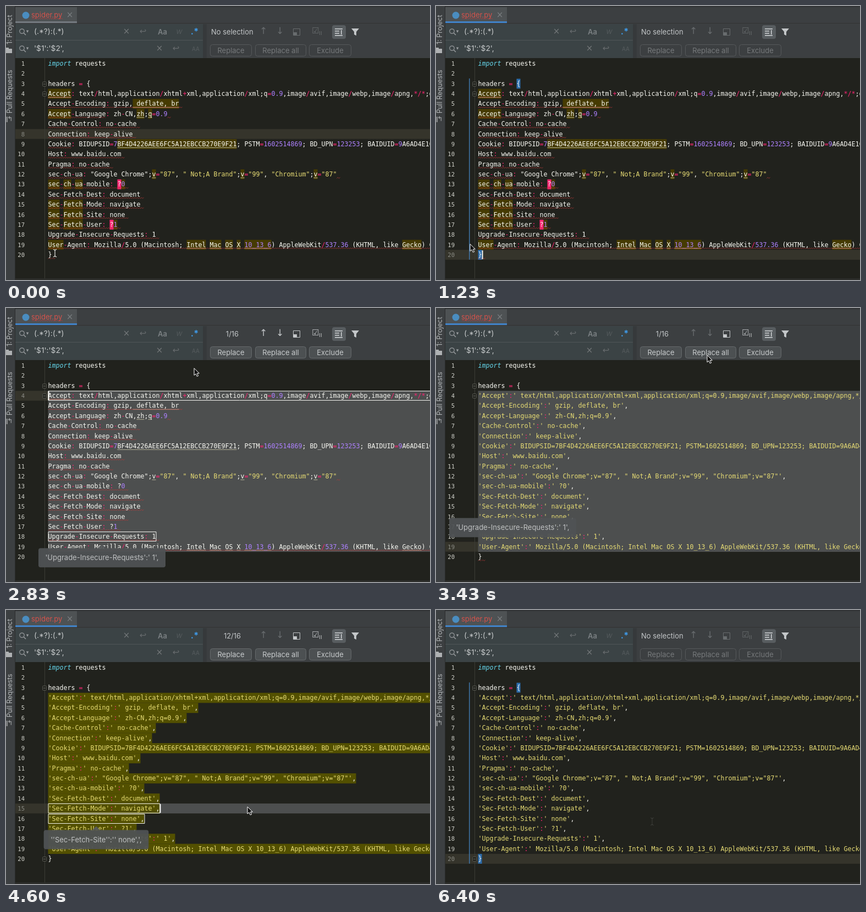
Recreate the animation shown at these times as an HTML page with a canvas. Size 771 by 500 pixels, loop 6.43 s.

```html
<!DOCTYPE html>
<html lang="en">
<head>
<meta charset="utf-8">
<title>Regex replace in an editor</title>
<style>
html, body { margin: 0; width: 100%; height: 100%; overflow: hidden; background: #21221d; }
canvas { display: block; }
</style>
</head>
<body>
<canvas id="stage" width="771" height="500"></canvas>
<script>
const c = document.getElementById('stage').getContext('2d');
const LOOP = 6430, LEFT = 76.5, CW = 7, ROW = 18.37;
const MONO = '11.65px "DejaVu Sans Mono", monospace';
const SANS = '13px Inter, sans-serif';
const RED = '#f92672', WHITE = '#f8f8f2', YELLOW = '#e6db74', PURPLE = '#ae81ff';
const ON = '#c3c6c8', OFF = '#686c6e', SELECTED = '#4d4f4f';

// Moments when the editor state changes
const T = { click: 450, press: 1330, drag: 1370, selected: 2000, hint: 2030,
            replace: 3370, settle: 3600, deselect: 4560, clear: 4900, brace: 6050 };

const raw = `import requests

headers = {
Accept: text/html,application/xhtml+xml,application/xml;q=0.9,image/avif,image/webp,image/apng,*/*;q=0.8
Accept-Encoding: gzip, deflate, br
Accept-Language: zh-CN,zh;q=0.9
Cache-Control: no-cache
Connection: keep-alive
Cookie: BIDUPSID=7BF4D4226AEE6FC5A12EBCCB270E9F21; PSTM=1602514869; BD_UPN=123253; BAIDUID=9A6AD4E1C
Host: www.baidu.com
Pragma: no-cache
sec-ch-ua: "Google Chrome";v="87", " Not;A Brand";v="99", "Chromium";v="87"
sec-ch-ua-mobile: ?0
Sec-Fetch-Dest: document
Sec-Fetch-Mode: navigate
Sec-Fetch-Site: none
Sec-Fetch-User: ?1
Upgrade-Insecure-Requests: 1
User-Agent: Mozilla/5.0 (Macintosh; Intel Mac OS X 10_13_6) AppleWebKit/537.36 (KHTML, like Gecko) Chrome/87
}`.split('\n');
const quote = s => s.replace(/(.*?):(.*)/, "'$1':'$2',");
const quoted = raw.map(quote);

// Inspection marks: tinted words, and those also underlined
const tinted = /^Accept(?!-E)|^User|\b(sec|ch|ua)(?=.*mobile)|(Sec|Fetch)(?=-.*(Mode|Site|User))|(?<=\?)\d/g;
const unresolved = /^Accept(?=:)| deflate, br|zh(?=;)|(?<=zh;)q|BF4D\w+|\bv(?==)|Intel|Mac(?= )|OS|X(?= )|10_13_6|Gecko/g;

// Pointer moves: start, end, x, y of the tip
const moves = [[450, 900, 60, 246], [900, 1250, 62, 436], [1370, 2000, 62, 154], [2350, 3150, 493, 86],
  [3500, 4300, 439, 359], [4640, 5130, 338, 451], [5200, 5850, 105, 455], [6080, 6400, 393, 386]];

const mid = n => 105 + ROW * (n - 1);
const col = i => LEFT + CW * i;
const between = (t, a, b) => t >= a && t < b;
const clamp = v => Math.max(0, Math.min(1, v));

function rect(x, y, w, h, fill) { c.fillStyle = fill; c.fillRect(x, y, w, h); }

function text(s, x, y, color, font = SANS, align = 'left', base = 'alphabetic') {
  c.font = font; c.fillStyle = color; c.textAlign = align; c.textBaseline = base;
  c.fillText(s, x, y);
}

function icon(glyph, x, y, color, size = 15) {
  text(glyph, x, y, color, size + 'px "DejaVu Sans", sans-serif', 'center', 'middle');
}

function trace(points) {
  c.beginPath();
  for (let i = 0; i < points.length; i += 2) c.lineTo(points[i], points[i + 1]);
}

function line(color, width, ...points) {
  trace(points); c.strokeStyle = color; c.lineWidth = width; c.stroke();
}

function polygon(points, fill) { trace(points); c.fillStyle = fill; c.fill(); }

function paint(fill, stroke, width = 1) {
  if (fill) { c.fillStyle = fill; c.fill(); }
  if (stroke) { c.strokeStyle = stroke; c.lineWidth = width; c.stroke(); }
}

function circle(x, y, r, ...style) { c.beginPath(); c.arc(x, y, r, 0, 7); paint(...style); }

function box(x, y, w, h, r, ...style) { c.beginPath(); c.roundRect(x, y, w, h, r); paint(...style); }

function squiggle(x, w, y) {
  const points = [];
  for (let i = 0; i <= w; i += 2) points.push(x + i, y + (i % 4 ? -1 : 1));
  line('#c23a3a', .7, ...points);
}

function sideBar() {
  rect(0, 0, 16, 500, '#3c3f41');
  rect(16, 0, 1, 500, '#2b2d2e');
  for (const [s, y] of [['1: Project', 70], ['Pull Requests', 196]]) {
    c.save(); c.translate(11, y); c.rotate(-Math.PI / 2);
    text(s, 0, 0, '#b4b7b9', '12.5px Inter, sans-serif');
    c.restore();
  }
  rect(0, 76, 5, 3, '#afb1b3');
  rect(0, 78, 11, 8, '#afb1b3');
  rect(1, 202, 1.5, 10, '#afb1b3');
  icon('↰', 7, 207, '#afb1b3', 12);
}

function searchRow(y, s, end) {
  circle(29, y - 1, 4.2, null, '#9a9da0', 1.2);
  line('#9a9da0', 1.4, 32, y + 2, 36, y + 6);
  icon('▾', 39, y, '#9a9da0', 9);
  text(s, 51, y + 4, '#c8cbcc', '13.7px Inter, sans-serif');
  icon('×', end, y, '#74787a');
  icon('↩', end + 30, y, OFF);
}

function button(s, x, w, active) {
  box(x + .5, 70.5, w, 21, 4, active && '#4c5052', active ? '#65696b' : '#56595b');
  text(s, x + w / 2 + .5, 86, active ? '#c8cbcd' : '#76797b', SANS, 'center');
}

function toolbar(t, active, arrows, count) {
  rect(17, 0, 754, 95, '#3c3f41');
  rect(17, 0, 754, 2, '#303234');
  rect(17, 2, 112, 29, '#4e5254');
  rect(17, 28, 112, 3, t < T.click ? '#747a80' : '#4083c9');
  rect(129, 31, 642, 1, '#323232');
  circle(36, 17, 6.5, '#4a8dc0');
  text('spider.py', 46, 21, '#d5524b');
  if (t < T.settle) squiggle(47, 57, 23);
  icon('×', 116, 17, '#7b7f82');

  rect(17, 33, 341, 62, '#3b4345');
  rect(17, 62, 341, 1, '#505557');
  rect(358, 33, 7, 62, '#36393b');
  searchRow(47, '(.*?):(.*)', 219);
  searchRow(78, "'$1':'$2',", 279);
  text('Aa', 276, 52, '#7b8083', '600 13px Inter, sans-serif');
  text('W', 315, 51, '#565c5e', 'italic 11px Inter, sans-serif', 'center');
  text('.*', 343, 52, '#3f9bea', '700 16px Inter, sans-serif', 'center');
  text('AA', 345, 82, '#565c5e', '10px Inter, sans-serif', 'center');

  const tint = active ? ON : OFF, arrow = arrows ? ON : OFF;
  if (active) text(count, 411.5, 52, ON, SANS, 'center');
  else text('No selection', 373, 52, ON);
  icon('↑', 468, 47, arrow, 17);
  icon('↓', 498, 47, arrow, 17);
  box(522.5, 41.5, 12, 12, 0, null, tint);
  rect(523, 48, 6, 5, tint);
  icon('☑', 563, 46, tint);
  icon('II', 572, 51, tint, 9);
  box(593, 35, 25, 25, 4, '#585d60');
  for (let i = 0; i < 4; i++) rect(598, 41 + 4 * i, i % 3 ? 8 : 14, 1.5, '#d4d7d9');
  rect(609, 44, 1.5, 8, '#d4d7d9');
  polygon([628, 41, 642, 41, 637, 47, 637, 54, 633, 52, 633, 47], ON);
  button('Replace', 371, 75, active);
  button('Replace all', 453, 92, active);
  button('Exclude', 551, 76, active);
}

function tokenColor(token, before) {
  if (token === 'import') return '#66d9ef';
  if (/^[-:\/+*=]$/.test(token)) return RED;
  if (['1', '5.0', '"Google Chrome"'].includes(token) && before !== '?') return WHITE;
  if (/^['"]/.test(token)) return YELLOW;
  return /^\d/.test(token) ? PURPLE : WHITE;
}

function codeLine(s, y) {
  for (const m of s.matchAll(/'[^']*'|"[^"]*"|[A-Za-z_]\w*|\d[\d._]*|./g)) {
    const font = (m[0] === 'import' ? 'italic ' : '') + MONO;
    const color = tokenColor(m[0], s[m.index - 1]);
    [...m[0]].forEach((ch, i) => text(ch, col(m.index + i), y + 4, color, font));
  }
}

function marks(s, y, tint) {
  const each = (re, fn) => { for (const m of s.matchAll(re)) fn(col(m.index), CW * m[0].length); };
  if (tint) {
    for (const re of [tinted, unresolved]) each(re, (x, w) => rect(x, y - 9, w, 18, '#463b02'));
    each(/\?/g, (x, w) => rect(x, y - 9, w, 18, RED));
  }
  each(unresolved, (x, w) => rect(x, y + 6, w, 1, '#b5b299'));
}

// Syntax errors run under the whole line, or only the key before an assignment
function errors(s, y) {
  squiggle(LEFT, CW * (s.includes('=') ? s.indexOf(':') : s.length), y + 6.5);
  squiggle(col(s.length), CW, y + 6.5);
}

function outline(n, s) {
  box(LEFT + .5, Math.round(mid(n) - 9) + .5, s.length * CW, 17, 0, null, '#f4f4f0');
}

// Balloon under row n, centred on a match of the given length
function hint(s, n, length, alpha = .94) {
  c.save(); c.globalAlpha = alpha; c.font = SANS;
  const w = c.measureText(s).width + 25, m = col(length / 2), y = mid(n) + 21;
  polygon([m - 7, y, m, y - 7, m + 7, y], '#55585a');
  box(m - w / 2, y, w, 35, 4, '#4f5254');
  text(s, m, y + 22, '#c6c8c9', SANS, 'center');
  c.restore();
}

function pointer(t) {
  let x = 89, y = 451;
  for (const [from, to, endX, endY] of moves) {
    const k = clamp((t - from) / (to - from)), ease = k * k * (3 - 2 * k);
    x += (endX - x) * ease; y += (endY - y) * ease;
  }
  if (between(t, 820, 1000)) circle(x, y, 19, 'rgba(255,255,255,.07)', '#b4b4b0', 1.3);
  c.save(); c.translate(x, y);
  if (between(t, 620, 4700)) {
    const shape = [0, 0, 0, 13, 3, 10.3, 5.2, 15, 7.6, 14, 5.4, 9.5, 9.3, 9.3];
    polygon(shape, '#111');
    line('#fff', 1, ...shape, 0, 0);
  } else {
    c.globalAlpha = t > 6300 ? .12 : 1;
    line('#e8e8e4', 1.2, 0, -6, 0, 6);
    for (const s of [-1, 1]) line('#e8e8e4', 1.2, -3, 7 * s, 0, 5.5 * s, 3, 7 * s);
  }
  c.restore();
}

function draw(t) {
  const done = t >= T.replace, lines = done ? quoted : raw;
  const selecting = between(t, T.drag, T.deselect);
  const matched = between(t, T.deselect, T.clear);
  const hinted = between(t, T.hint, T.replace);
  const top = 19 - Math.round(15 * clamp((t - T.drag) / (T.selected - T.drag)));
  const current = t < T.click ? 8 : t < T.press ? 20 : t < T.replace ? top
    : t < T.deselect ? 19 : t < T.brace ? 15 : 20;

  rect(0, 0, 771, 500, '#21221d');
  rect(17, mid(current) - 9, 754, 18, '#35342b');
  rect(70, 95, 1, 405, '#3b3c36');
  if (selecting) rect(LEFT, mid(top) - 9, 771, ROW * (20 - top), SELECTED);
  if (matched) {
    for (let n = 4; n < 20; n++) rect(LEFT, mid(n) - 9, lines[n - 1].length * CW, 18.4, '#535000');
    if (t < T.deselect + 100) rect(col(29), mid(15) - 9, 500, 18, SELECTED);
  }

  // Fold marks and matching braces
  for (const n of [3, t < T.deselect ? 4 : 20]) {
    const y = Math.round(mid(n)) + .5;
    box(66.5, y - 4, 7, 8, 1, '#21221d', '#55564f');
    line('#6a6b64', 1, 68, y, 72, y);
  }
  if (current === 20) {
    rect(60, mid(3) - 9.5, 1.5, ROW * 18, '#3f74a8');
    rect(col(10), mid(3) - 9, 7, 18, '#2c6cab');
    rect(LEFT, mid(20) - 9, 7, 18, '#2c6cab');
  }

  lines.forEach((s, i) => {
    const n = i + 1, y = mid(n);
    text(n, 34, y + 4, n === current ? '#8c8d86' : '#d2d3cc', '10.5px "DejaVu Sans Mono", monospace', 'right');
    if (n > 3 && !done) marks(s, y, !selecting || n < top);
    if (n > 3 && (!done || (n === 20 && t < T.settle))) errors(s, y);
    codeLine(s, y);
  });

  if (hinted) { outline(4, raw[3]); outline(18, raw[17]); }
  if (matched) { outline(15, lines[14]); outline(16, lines[15]); }

  if (between(t, T.click, T.press)) rect(col(1), mid(20) - 8, 2, 16, WHITE);
  if (between(t, T.drag, T.replace)) rect(LEFT, mid(top) - 8, 2, 16, WHITE);
  if (between(t, T.deselect, T.brace)) rect(col(29), mid(15) - 8, 2, 16, WHITE);

  // The balloon jumps to a stale offset and fades once the text is replaced
  const fade = clamp((T.replace + 180 - t) / 110);
  if (hinted) hint(quoted[17], 18, raw[17].length);
  else if (done && fade) hint(quoted[17], 15, 18, .94 * fade);
  if (matched) hint(quote(quoted[15]), 16, quoted[15].length);

  toolbar(t, selecting || matched, selecting && !done, matched ? '12/16' : '1/' + (20 - top));
  sideBar();
  rect(17, 497, 754, 3, '#2c2d2a');
  pointer(t);
}

const start = performance.now();
function frame() {
  draw((performance.now() - start) % LOOP);
  requestAnimationFrame(frame);
}
frame();
</script>
</body>
</html>
```
